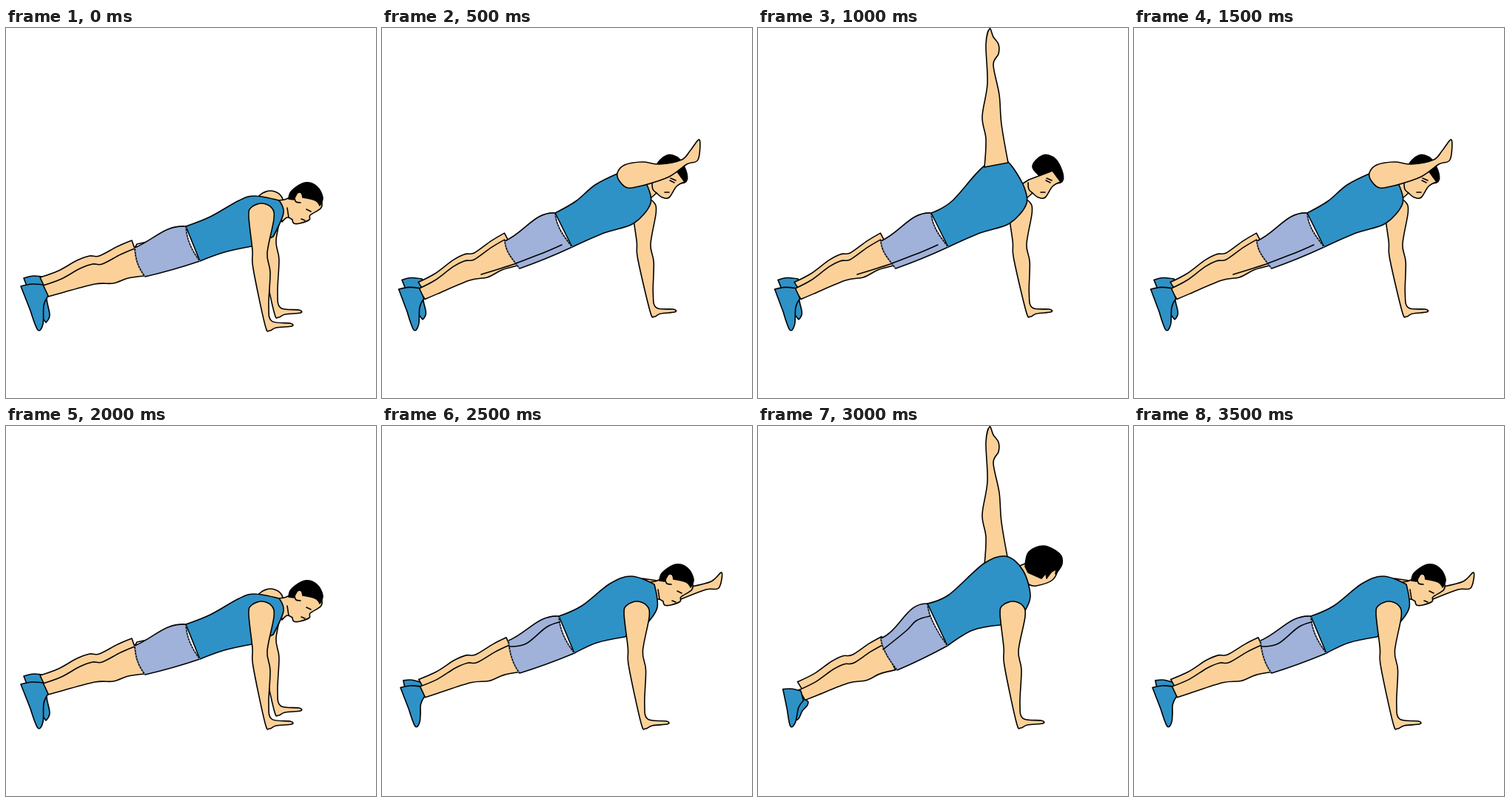
An HTML page for the animation above (4000 ms loop, 500 by 500 pixels).

```html
<!DOCTYPE html>
<html>
<head>
<meta charset="utf-8">
<title>Push-up with rotation</title>
<style>
html, body { margin: 0; width: 100%; height: 100%; overflow: hidden; background: #fff; }
svg { display: block; width: 100vw; height: 100vh; }
path { stroke: #000; stroke-width: 1.6; stroke-linejoin: round; stroke-linecap: round; }
.hem { stroke: #7f97c6; stroke-width: 1.4; stroke-dasharray: 1.5 2.5; stroke-linecap: butt; }
</style>
</head>
<body>
<svg id="stage" viewBox="0 0 500 500"></svg>
<script>
const STEP = 500;
const SKIN = '#fbd199', BLUE = '#2e92c7', LILAC = '#a0b2da', HAIR = '#000', LINE = 'none';

// Key points of an outline; "!" marks a sharp corner.
const read = text => text.split(' ').map(w => {
  const [x, y] = w.replace('!', '').split(',').map(Number);
  return { x, y, sharp: w.endsWith('!') };
});

// Smooth curve through the points, closed unless it is a bare line.
function draw(fill, pts) {
  const n = pts.length, closed = fill !== LINE;
  const at = i => closed ? pts[(i + n) % n] : pts[Math.max(0, Math.min(n - 1, i))];
  const handle = (i, side) => {
    const p = at(i), k = p.sharp ? 0 : side / 6;
    return `${p.x + (at(i + 1).x - at(i - 1).x) * k},${p.y + (at(i + 1).y - at(i - 1).y) * k}`;
  };
  let d = `M${pts[0].x},${pts[0].y}`;
  for (let i = 0; i < (closed ? n : n - 1); i++) {
    d += `C${handle(i, 1)} ${handle(i + 1, -1)} ${at(i + 1).x},${at(i + 1).y}`;
  }
  return `<path fill="${fill}" d="${d}"/>`;
}

const shape = (fill, text) => draw(fill, read(text));
const skin = text => shape(SKIN, text);
const blue = text => shape(BLUE, text);
const hair = text => shape(HAIR, text);
const line = text => shape(LINE, text);

// A body part is turned and scaled so that its joints a, b land on two new places.
function limb(fill, a, b, text) {
  const pts = read(text), dx = b[0] - a[0], dy = b[1] - a[1], len2 = dx * dx + dy * dy;
  return (x1, y1, x2, y2) => {
    const ex = x2 - x1, ey = y2 - y1;
    const cos = (ex * dx + ey * dy) / len2, sin = (ey * dx - ex * dy) / len2;
    return draw(fill, pts.map(({ x, y, sharp }) => {
      const u = x - a[0], v = y - a[1];
      return { x: x1 + u * cos - v * sin, y: y1 + u * sin + v * cos, sharp };
    }));
  };
}

const leg = limb(SKIN, [54, 355], [181, 317],
  '50,348! 75,339 100,325 117,319 130,319 155,306 174,298! 187,335! 165,338 145,345 120,346 75,358 57,363!');
const foot = limb(BLUE, [54, 355], [43, 407],
  '20,349! 35,346 50,347! 57,362! 51,375 50,400 43,408 33,382!');
const farFoot = limb(BLUE, [54, 337], [54, 398],
  '24,338! 38,335 54,337! 57,347 55,366 59,388 54,398! 40,380!');
const arm = limb(SKIN, [346, 238], [356, 409],
  '328,254 332,242 346,237 359,243 362,258 353,304 357,330 355,375 359,396 384,399 386,403 365,405 356,409 350,401 334,325 333,300');
const raisedArm = limb(SKIN, [322, 183], [313, 1],
  '306,188! 308,150 303,120 310,75 308,22 313,1 318,12 325,22 325,35 318,50 326,90 329,130 338,182!');

// Shorts follow from the ends of the waist and the hem.
function shorts([ax, ay], [bx, by], [cx, cy], [dx, dy]) {
  const waist = `C${bx - 11},${by - 14} ${ax + 1},${ay + 18} ${ax},${ay}`;
  const hem = `C${cx + 1},${cy + 14} ${dx - 11},${dy - 14} ${dx},${dy}`;
  const top = `C${ax - 28},${ay - 2} ${cx + 26},${cy - 11} ${cx},${cy}`;
  return `<path fill="${LILAC}" d="M${bx},${by}${waist}${top}${hem}Q${(bx + dx) / 2},${(by + dy) / 2 + 2} ${bx},${by}Z"/>` +
    `<path class="hem" fill="none" d="M${bx},${by}${waist}M${cx},${cy}${hem}"/>`;
}

const profile = (x, y) => `<g transform="translate(${x} ${y})">` +
  skin('368,233! 376,232 383,229! 404,215! 427,236! 425,244 411,253 410,259 397,264 389,264 387,259! 380,256 373,262!') +
  hair('382,231! 386,220 404,209 420,214 428,229 424,240! 418,233 401,229! 399,223 394,223 389,232!') +
  line('390,230! 392,235 398,236') + line('380,243! 382,256!') +
  line('406,245! 412,248') + line('399,258! 404,260') + '</g>';

const plank = [
  farFoot(54, 337, 54, 398), leg(50, 344, 177, 306), leg(54, 355, 181, 317), foot(54, 355, 43, 407),
  arm(358, 221, 368, 391), profile(0, 0),
  blue('243,268! 276,255 315,233 336,227 369,233! 375,250 361,282! 332,295! 295,303 262,315!'),
  line('174,297! 177,292! 200,287!'),
  shorts([243, 268], [262, 315], [174, 297], [188, 336]),
  arm(346, 238, 356, 409)
];

const openBody = [
  farFoot(54, 339, 55, 394), leg(54, 350, 175, 295), leg(54, 359, 175, 304), foot(54, 359, 43, 407),
  line('134,333! 160,325 182,318!'),
  arm(355, 231, 368, 390),
  hair('371,188 385,172 402,177 412,197 409,209 390,206'),
  skin('355,212! 366,205! 398,193! 409,208! 398,214 388,229 379,229 371,223! 363,230!'),
  line('365,209! 366,218 371,223'), line('389,206! 395,209'), line('390,203! 397,206'), line('382,222! 388,222')
];
const openShorts = shorts([234, 250], [257, 296], [166, 288], [186, 325]) + line('181,318! 220,303 243,293!');

const reachFront = [
  ...openBody,
  blue('234,250! 262,234 288,212 320,196! 358,212! 363,237 340,264 300,277 257,296!'),
  openShorts,
  skin('318,196 328,185 352,181 375,184 405,178 417,165 429,151 427,178 412,184 388,201 352,213 332,216 321,207')
];

const raiseFront = [
  ...openBody,
  blue('234,250! 262,234 305,187 335,179 358,211! 363,237 340,264 300,277 257,296!'),
  openShorts,
  raisedArm(322, 183, 313, 1)
];

const raiseBack = [
  farFoot(68, 373, 50, 398), leg(58, 352, 176, 302), leg(60, 363, 178, 313), foot(60, 365, 44, 405),
  raisedArm(322, 183, 313, 1),
  skin('349,191! 363,185! 406,192! 398,208 376,216 366,214!'),
  blue('229,240! 258,228 305,186 335,176 358,195 368,230 358,254! 327,269! 290,276 256,297!'),
  shorts([229, 240], [256, 297], [166, 287], [188, 330]),
  line('169,302! 200,277 214,263 232,257!'),
  hair('361,190! 366,170 386,162 407,172 411,186 402,200! 403,194! 397,197 390,206! 389,199! 383,206! 365,198!'),
  arm(345, 238, 355, 408)
];

const reachBack = [
  farFoot(54, 347, 46, 398), leg(54, 349, 176, 304), leg(55, 359, 179, 315), foot(55, 359, 45, 405),
  skin('352,206! 372,209! 418,217! 445,210 459,198 455,219 438,221 404,234!'),
  profile(-7, -22),
  blue('239,257! 270,243 308,213 337,203 368,214! 372,245 358,267! 328,285! 290,293 260,307!'),
  shorts([239, 257], [260, 307], [171, 290], [186, 334]),
  line('172,298! 195,294 222,272 240,265!'),
  arm(345, 238, 356, 409)
];

const SEQ = [plank, reachFront, raiseFront, reachFront, plank, reachBack, raiseBack, reachBack]
  .map(parts => parts.join(''));

const stage = document.getElementById('stage');
const start = performance.now();
let shown = -1;

function render(now) {
  const i = Math.floor(Math.max(0, now - start) / STEP) % SEQ.length;
  if (i !== shown) stage.innerHTML = SEQ[shown = i];
  requestAnimationFrame(render);
}
render(start);
</script>
</body>
</html>
```
